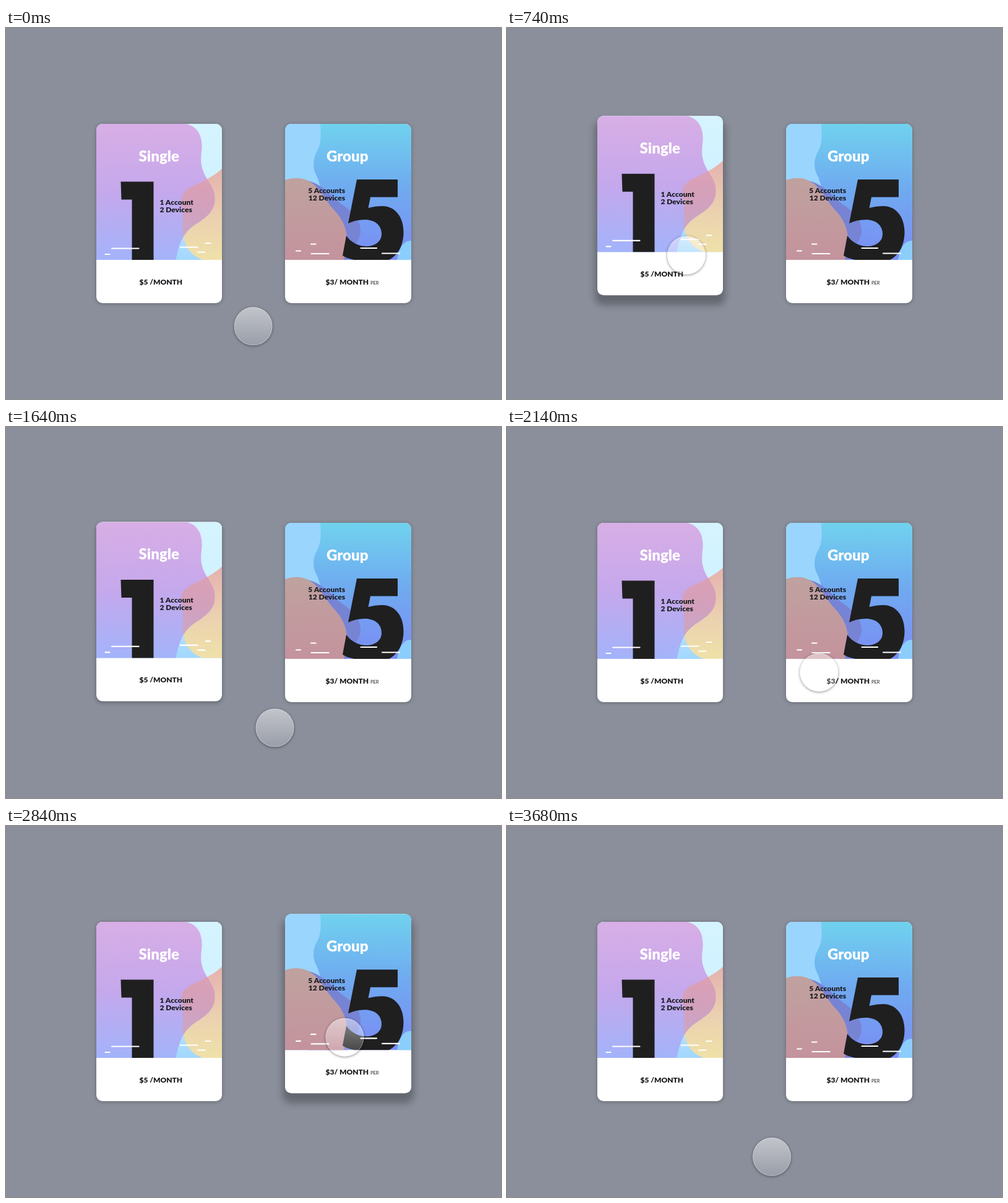
An HTML page for the animation above (3.7 s loop, 800 px wide and 600 px high).

```html
<!DOCTYPE html>
<html lang="en">
<head>
<meta charset="utf-8">
<title>Plan cards</title>
<style>
  html, body { margin: 0; width: 100%; height: 100%; overflow: hidden; background: #8a8f9b; }
  .card { position: absolute; top: 155px; width: 203.5px; height: 290px; border-radius: 10px; overflow: hidden; background: #fff; }
  #single { left: 145.5px; }
  #group { left: 451px; }
  svg { display: block; width: 100%; height: 100%; }
  text { font: 900 12px Lato, sans-serif; fill: #1c1c20; }
  .title { font-size: 24px; fill: #fff; }
  .per { font-size: 7.5px; font-weight: 400; }
  .digit { fill: #1f1f20; }
  .dashes { stroke: #fff; stroke-width: 2.2; stroke-linecap: round; }
  #cursor {
    position: absolute; left: -31px; top: -31px; width: 62px; height: 62px; border-radius: 50%;
    background: linear-gradient(rgba(255,255,255,.48), rgba(255,255,255,.13));
    box-shadow: inset 0 0 0 1px rgba(255,255,255,.3), 0 1px 4px rgba(0,0,0,.45);
  }
</style>
</head>
<body>
<div class="card" id="single">
  <svg viewBox="145.5 155 203.5 290">
    <defs>
      <linearGradient id="ice" x2="0" y2="1"><stop stop-color="#d5f4ff"/><stop offset=".5" stop-color="#d0f1ff"/><stop offset="1" stop-color="#a2d7fd"/></linearGradient>
      <linearGradient id="lilac" x2="0" y2="1"><stop stop-color="#d8aee5"/><stop offset=".5" stop-color="#c5a8ec"/><stop offset="1" stop-color="#a3b3fa"/></linearGradient>
      <linearGradient id="sand" x2="0" y2="1"><stop stop-color="#e5b1ae"/><stop offset=".55" stop-color="#ebd1b0"/><stop offset="1" stop-color="#efe1a8"/></linearGradient>
      <linearGradient id="rose" x2="0" y2="1"><stop stop-color="#dfa0b2"/><stop offset=".4" stop-color="#d3a0bb"/><stop offset="1" stop-color="#c3abd0"/></linearGradient>
      <path id="wave" d="M145 155H291C310 160 317 175 316 195C314 214 313 222 322 240C331 255 337 262 337 276C337 300 318 309 301 321C285 333 279 350 274 375H145Z"/>
      <path id="pebble" d="M350 226C332 243 312 250 297 258C285 265 280 274 284 290C288 306 282 324 287 341C292 361 305 371 318 375H350Z"/>
      <clipPath id="inWave"><use href="#wave"/></clipPath>
    </defs>
    <path d="M145 155h205v220h-205z" fill="url(#ice)"/>
    <use href="#pebble" fill="url(#sand)"/>
    <use href="#wave" fill="url(#lilac)"/>
    <g clip-path="url(#inWave)"><use href="#pebble" fill="url(#rose)"/></g>
    <path class="digit" d="M185 248.5H238V375H203V277.500H186Z"/>
    <path class="dashes" d="M170.500 356.500H214M160 366H167M281.500 354.500H309M309.500 362.500H321M322 348H330"/>
    <text class="title" x="214" y="215.500">Single</text>
    <text x="248" y="285.500">1 Account</text>
    <text x="248" y="297.500">2 Devices</text>
    <text x="215" y="414.500">$5 /MONTH</text>
  </svg>
</div>
<div class="card" id="group">
  <svg viewBox="451 155 203.5 290">
    <defs>
      <linearGradient id="sea" x2="0" y2="1"><stop stop-color="#70d2ee"/><stop offset=".45" stop-color="#6facf0"/><stop offset="1" stop-color="#7b8cf4"/></linearGradient>
      <linearGradient id="clay" x2="0" y2="1"><stop stop-color="#bfa29f"/><stop offset="1" stop-color="#c4939d"/></linearGradient>
    </defs>
    <path d="M451 155h204v220h-204z" fill="url(#sea)"/>
    <path fill="#9ad5fe" d="M451 155H508C509 178 509 188 503 199C495 212 495 228 503 241L510 262H451Z"/>
    <path fill="#8bcdfb" d="M655 344C641 344 635 357 632 375H655Z"/>
    <path fill="#7784d4" d="M487 247C510 252 525 270 541 284C560 297 573 309 573 328C573 345 559 352 552 375H487Z"/>
    <path fill="url(#clay)" d="M451 246C465 241 480 242 490 248C508 258 515 278 530 294C543 308 550 322 551 340L546 375H451Z"/>
    <path class="digit" d="M567 245H633V273.500H589L585.500 291C593 289 601 288 608 288C630 288 642.500 307 642.500 330C642.500 351 634 367 619 375H563C554 373 548 371 544 368L550 336C557 346 569 353 582 353C597 353 607 345 607 333C607 319 596 310 580 310C570 310 561 312 553 316Z"/>
    <path class="dashes" d="M469 360.500H476M493 349.500H500.500M493.500 365H521.500M573.500 356H599M608 364.500H636"/>
    <text class="title" x="518" y="215.500">Group</text>
    <text x="548" y="267" text-anchor="end">5 Accounts</text>
    <text x="548" y="279" text-anchor="end">12 Devices</text>
    <text x="516.500" y="414.500">$3/ MONTH</text>
    <text class="per" x="589" y="414.500">PER</text>
  </svg>
</div>
<div id="cursor"></div>
<script>
  const LOOP = 3700, RISE = 12.7;
  const byId = id => document.getElementById(id);

  // Eased 0..1 progress between two moments
  function progress(t, start, end) {
    const p = Math.min(1, Math.max(0, (t - start) / (end - start)));
    return p < .5 ? 2 * p * p : 1 - 2 * (1 - p) ** 2;
  }

  // Cursor moves: start, end, from, to
  const moves = [
    [-350, 560, [446, 531], [290, 367.5]],
    [1020, 1640, [290, 367.5], [434.5, 486.5]],
    [1640, 2535, [434.5, 486.5], [548.5, 340]],
    [2800, 3420, [548.5, 340], [428, 535]]
  ];

  function cursorAt(t) {
    const [start, end, from, to] = moves.filter(([begin]) => begin <= t).pop();
    const p = progress(t, start, end);
    return from.map((v, i) => v + (to[i] - v) * p);
  }

  function setLift(id, lift) {
    const { style } = byId(id);
    style.transform = `translateY(${-RISE * lift}px)`;
    style.boxShadow = `0 ${1 + 11 * lift}px ${6 + 6 * lift}px ${4 * lift}px rgba(0,0,0,.28)`;
  }

  function draw() {
    const t = performance.now() % LOOP;
    setLift('single', progress(t, 200, 500) - progress(t, 1400, 1720));
    setLift('group', progress(t, 2200, 2500) - progress(t, 3200, 3520));
    const [x, y] = cursorAt(t);
    byId('cursor').style.transform = `translate(${x}px, ${y}px)`;
    requestAnimationFrame(draw);
  }
  draw();
</script>
</body>
</html>
```
